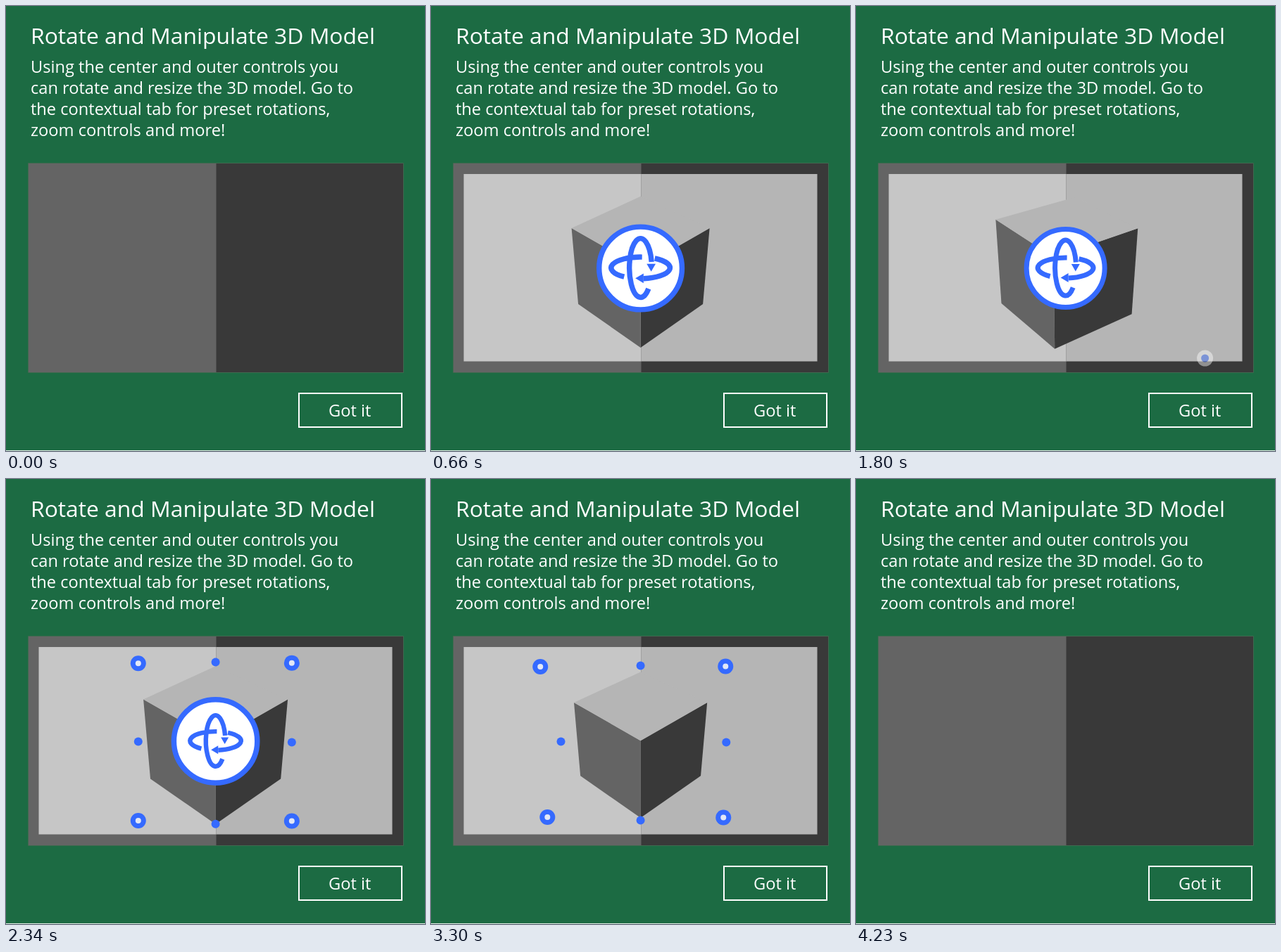
An HTML page for the animation above (4470 ms loop, 595 px wide and 633 px high).

```html
<!DOCTYPE html>
<html lang="en">
<head>
<meta charset="utf-8">
<title>Rotate and Manipulate 3D Model</title>
<style>
  html, body { margin: 0; width: 100%; height: 100%; overflow: hidden; background: #1c6b43; }
  svg { display: block; width: 595px; height: 633px; }
  text { font: 23.65px "Open Sans", "Noto Sans", sans-serif; fill: #fff; }
  text.title { font-size: 31.8px; }
  .blue { fill: #356aff; }
  .line { fill: none; stroke: #356aff; stroke-width: 7; }
</style>
</head>
<body>
<svg viewBox="0 0 595 633">
  <defs><clipPath id="window"><path d="M46.5 239H548.5V505.5H46.5z"/></clipPath></defs>
  <path d="M0 632H595V633H0z" fill="#e4eee8"/>
  <text class="title" x="35" y="54">Rotate and Manipulate 3D Model</text>
  <text x="35" y="95">Using the center and outer controls you</text>
  <text x="35" y="125">can rotate and resize the 3D model. Go to</text>
  <text x="35" y="155">the contextual tab for preset rotations,</text>
  <text x="35" y="185">zoom controls and more!</text>
  <path d="M416 551H562V599H416z" fill="none" stroke="#fff" stroke-width="2"/>
  <text x="458" y="584">Got it</text>

  <path d="M31.5 223.5H564.5V521.5H31.5z" fill="#393939" stroke="#40694f"/>
  <path d="M32 224H298.5V521H32z" fill="#646464"/>
  <g id="scene">
    <path d="M46.5 239H298.5V505.5H46.5z" fill="#c6c6c6"/>
    <path d="M298.5 239H548.5V505.5H298.5z" fill="#b5b5b5"/>
    <g id="cube" clip-path="url(#window)"></g>
    <g id="icon">
      <circle class="line" r="55.5" style="fill:#fff"/>
      <g id="glyph">
        <path class="line" d="M10.6 28A15 39.5 0 1 1 14.7 -8M-22 12A39.5 14.5 0 0 1 2 -14.5M19 -12.7A39.5 14.5 0 0 1 4 14.4"/>
        <path class="blue" d="M8.2 -5.5h12l-6 10.5zM4 7.5v13l-11 -6.5z"/>
      </g>
    </g>
    <g id="handles"></g>
    <g id="pointer"><circle r="11.5" fill="#fff"/><circle class="blue" r="5.5"/></g>
  </g>
</svg>
<script>
const LOOP = 4470, CX = 297.6, CY = 372.8;
const $ = id => document.getElementById(id);
const clamp = v => Math.min(1, Math.max(0, v));

function add(parent, tag, attrs) {
  const el = document.createElementNS('http://www.w3.org/2000/svg', tag);
  for (const k in attrs) el.setAttribute(k, attrs[k]);
  return parent.appendChild(el);
}

// Eased value through time/value pairs
function track(t, ...keys) {
  let i = 0;
  while (i + 2 < keys.length && t > keys[i + 2]) i += 2;
  if (i + 2 >= keys.length) return keys[i + 1];
  const u = clamp((t - keys[i]) / (keys[i + 2] - keys[i]));
  return keys[i + 1] + (keys[i + 3] - keys[i + 1]) * (1 - Math.cos(Math.PI * u)) / 2;
}

// x, y, sideways drift, corner?
const handles = [
  [-105, -106, -37, 1], [103.5, -106.5, 17, 1], [-105, 108, -27, 1], [103.5, 108.5, 14, 1],
  [0, -107.5, 0, 0], [0, 112.5, 0, 0], [-105, .5, -8, 0], [103.5, 1.5, 18, 0]
].map(([x, y, drift, corner]) => {
  const g = add($('handles'), 'g', {});
  add(g, 'circle', { class: 'blue', r: corner ? 11 : 6 });
  if (corner) add(g, 'circle', { r: 4, fill: '#e3e8f6' });
  return { g, x, y, drift };
});

const faces = Array.from({ length: 6 }, () => add($('cube'), 'polygon', {}));

function drawCube(yaw, pitch, scale) {
  const rad = Math.PI / 180, c = Math.cos(pitch * rad), s = Math.sin(pitch * rad);
  const angle = i => (i * 90 + yaw) * rad;
  const vertex = (i, y) => {
    const x = Math.SQRT2 * Math.sin(angle(i)), z = Math.SQRT2 * Math.cos(angle(i));
    const k = scale * 742 / (11.28 - z * c - y * s);
    return [CX + x * k, CY - (y * c - z * s) * k];
  };
  const top = [0, 1, 2, 3].map(i => vertex(i, 1)), low = [0, 1, 2, 3].map(i => vertex(i, -1));
  const show = (el, pts, fill) => {
    const [a, b, d] = pts;
    const front = (b[0] - a[0]) * (d[1] - a[1]) - (b[1] - a[1]) * (d[0] - a[0]) > 0;
    el.setAttribute('points', front ? pts.join(' ') : '');
    el.setAttribute('fill', fill);
  };
  for (let i = 0; i < 4; i++) {
    const j = (i + 1) % 4;
    const grey = Math.round(100 - 43 * clamp(.5 + .9 * Math.sin(angle(i + .5))));
    show(faces[i], [top[i], top[j], low[j], low[i]], `rgb(${grey},${grey},${grey})`);
  }
  show(faces[4], [...top].reverse(), '#b5b5b5');
  show(faces[5], low, '#232323');
}

function place(el, x, y, scale, opacity) {
  el.setAttribute('transform', `translate(${x} ${y}) scale(${scale})`);
  el.setAttribute('opacity', opacity);
}

function draw(t) {
  $('scene').style.display = t >= 30 && t < 3750 ? '' : 'none';

  // Short pulse when the resize handles appear
  const pulse = t < 2280 ? 0 : .085 * Math.pow(1 - clamp((t - 2280) / 180), 1.5);

  const yaw = track(t, 1260, 0, 1935, 90);
  const pitch = track(t, 30, 0, 450, 35, 930, 35, 1200, -26, 1260, -26, 1935, 35, 3300, 35, 3690, 0);
  const zoom = track(t, 30, 3, 450, 1, 1740, 1, 1890, 1.138, 2040, .99, 2130, 1,
    2940, 1, 3180, .965, 3300, .965, 3720, 3);
  drawCube(yaw, pitch, zoom * (1 + pulse));

  const pop = 1 + .29 * Math.pow(1 - clamp((t - 600) / 150), 3);
  const iconScale = t < 600 ? 0 : pop * (1 + 1.45 * pulse) * track(t, 2940, 1, 3120, 0);
  place($('icon'), 297.6, 373, iconScale, clamp((t - 570) / 90));
  place($('glyph'), 0, -.5, 1 - 3 * pulse, 1);

  const px = track(t, 1260, 0, 1740, 198);
  const py = track(t, 930, 0, 1200, -108.3, 1260, -108.3, 1740, 128);
  const shown = clamp((t - 870) / 90) * (1 - clamp((t - 1740) / 110));
  place($('pointer'), 297.6 + px, 373 + py, 1, shown);

  $('handles').setAttribute('opacity', t < 2280 ? 0 : 1 - clamp((t - 3390) / 90));
  const away = Math.pow(Math.max(0, t - 3150) / 150, 1.5), spread = 1 + pulse;
  for (const h of handles)
    place(h.g, 297.6 + h.x * spread + h.drift * away, 373 + h.y * spread, 1, 1);
}

const start = performance.now();
(function tick() {
  draw((performance.now() - start) % LOOP);
  requestAnimationFrame(tick);
})();
</script>
</body>
</html>
```
